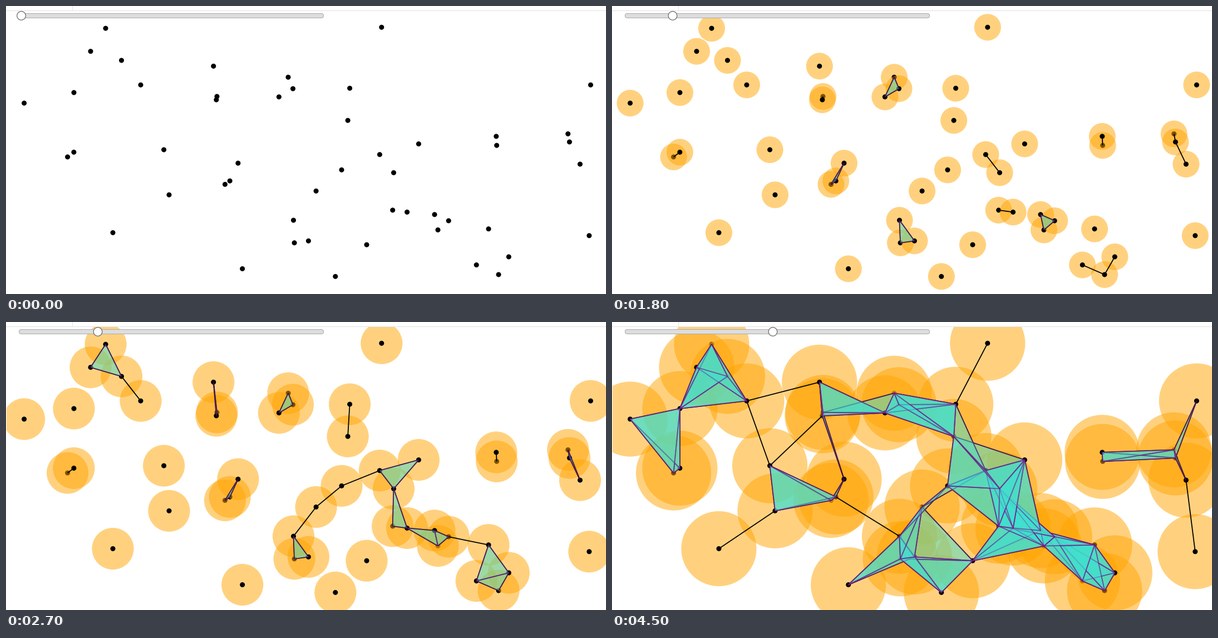
Write a matplotlib script that moves like this. It is 1078 px wide and 519 px high and loops after 5400 ms.

```python
from itertools import combinations

import matplotlib.pyplot as plt
import numpy as np
from matplotlib.animation import FuncAnimation
from matplotlib.collections import LineCollection, PatchCollection, PolyCollection
from matplotlib.colors import to_rgba
from matplotlib.patches import Circle, FancyBboxPatch, Rectangle

W, H, DPI = 1078, 519, 64
PX = 72 / DPI  # one pixel in points
STROKE = 1.8 * PX
DOT = 4.5
KNOBS = [27.5, 75, 109, 165, 222, 289]
ORANGE, TURQUOISE, PURPLE = (to_rgba(c, 0.5) for c in ("orange", "turquoise", "purple"))

# The sample, in paint order; every disc, edge and face follows from it.
POINTS = np.array([
    (179, 40.2), (207.5, 98), (152, 81.7), (242, 142.2), (122, 156),
    (32.6, 175), (110.6, 272), (121.9, 263.4), (283.6, 259), (293, 340.3),
    (192, 408.5), (379, 163), (377.9, 169), (372.8, 108.4), (507, 128.3),
    (515.5, 149), (490.4, 163.8), (614.1, 206.2), (617.6, 148.2), (674.8, 38.3),
    (741.4, 248.5), (696.5, 300.4), (671.4, 267.7), (557.1, 333.4), (603, 295.3),
    (393.5, 321.4), (402.2, 315.2), (416.9, 283.2), (518.1, 426.8), (516.5, 386.1),
    (543.4, 423.3), (424.7, 473.5), (591.8, 487.4), (648, 430.2), (694.7, 367.9),
    (720.6, 371.4), (776, 403.5), (795.2, 387), (770, 375.8), (867, 401.7),
    (845.2, 466.6), (885, 484), (903.3, 452), (881.6, 251.2), (880.8, 234.9),
    (1009.7, 230.4), (1012.4, 245), (1031.4, 285), (1050.4, 142.2), (1047.8, 413.8),
])
GAPS = np.hypot(*(POINTS[:, None] - POINTS).T)


def reach(i, j, k):
    """Radius of the smallest circle around three points."""
    a, b, c = sorted((GAPS[i, j], GAPS[i, k], GAPS[j, k]))
    if a * a + b * b <= c * c:
        return c / 2
    s = (a + b + c) / 2
    return a * b * c / (4 * np.sqrt(s * (s - a) * (s - b) * (s - c)))


IDS = range(len(POINTS))
EDGES = [(e, GAPS[e] / 2) for e in combinations(IDS, 2)]
FACES = [(f, reach(*f)) for f in combinations(IDS, 3)][::-1]


def shapes(simplices, r):
    """Simplices whose discs of radius r share a common point."""
    return [POINTS[list(s)] for s, size in simplices if size <= r]


fig = plt.figure(figsize=(W / DPI, H / DPI), dpi=DPI, facecolor="white")
ax = fig.add_axes([0, 0, 1, 1])
ax.set(xlim=(0, W), ylim=(H, 0), autoscale_on=False)
ax.axis("off")
view = Rectangle((1, 9), W - 1, H - 9, transform=ax.transData)

# Page header lines
ax.add_patch(Rectangle((0, 8), W, 1, fc="#e2e2e2", lw=0))
ax.add_patch(Rectangle((119, 0), 1, 8, fc="#e2e2e2", lw=0))

# Slider
ax.add_patch(FancyBboxPatch((23.5, 13.5), 547, 8, boxstyle="round,pad=0,rounding_size=4",
                            fc="#dddddd", ec="#aaaaaa", lw=PX, zorder=5))
knob = ax.add_patch(Circle((KNOBS[0], 17.5), 7.8, fc="white", ec="#666666",
                           lw=1.2 * PX, zorder=6))
layers = []


def add(layer, zorder):
    layer.set_zorder(zorder)
    ax.add_collection(layer, autolim=False)
    layer.set_clip_path(view)
    layers.append(layer)


def draw(i):
    while layers:
        layers.pop().remove()
    x = KNOBS[i]
    knob.center = x, 17.5
    r = 15.8 + 0.242 * (x - 75)

    marks = [Circle(p, size) for p in POINTS for size in (r, DOT)]
    add(PatchCollection(marks, facecolors=[ORANGE, "black"] * len(POINTS),
                        linewidths=0), 2)
    add(LineCollection(shapes(EDGES, r), colors="black", linewidths=STROKE), 3)
    add(PolyCollection(shapes(FACES, r), facecolors=[TURQUOISE], edgecolors=[PURPLE],
                       linewidths=STROKE, joinstyle="round"), 4)
    return layers + [knob]


anim = FuncAnimation(fig, draw, frames=len(KNOBS), init_func=lambda: draw(0),
                     interval=900, repeat=True, repeat_delay=0, blit=False)
plt.show()
```
